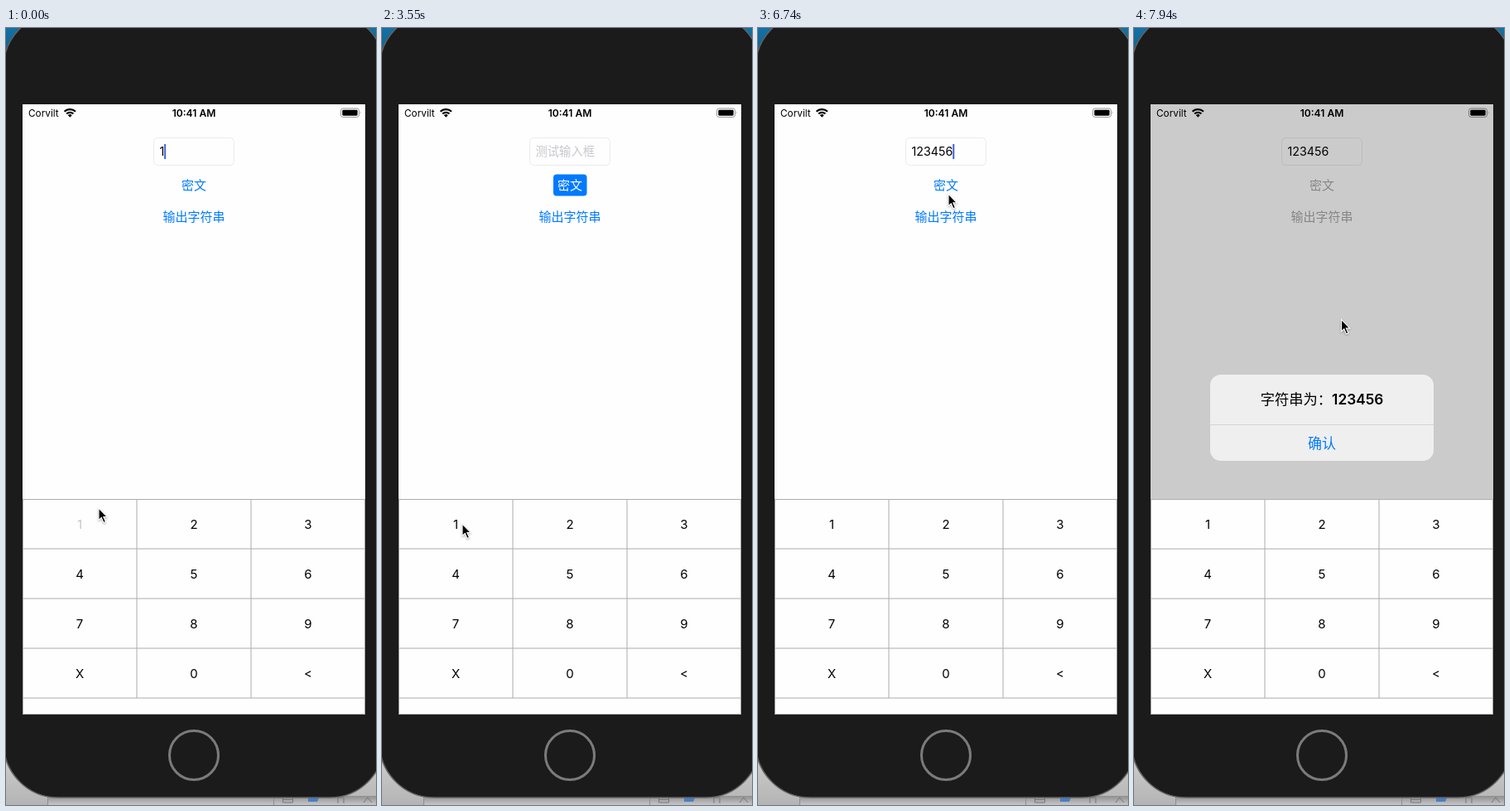
These frames come from a looping animation (447x937 px, 8000 ms). An HTML page:

```html
<!DOCTYPE html>
<html lang="zh-CN">
<head>
<meta charset="utf-8">
<style>
html, body { margin: 0; width: 100%; height: 100%; overflow: hidden; }
svg { display: block; width: 447px; height: 937px; font-family: Inter, "Noto Sans CJK SC", "Noto Sans CJK", sans-serif; }
.mid { text-anchor: middle; }
.rule { stroke: #acacac; fill: none; }
</style>
</head>
<body>
<svg viewBox="0 0 447 937">
  <defs>
    <linearGradient id="desk" x2="0" y2="1">
      <stop offset="0" stop-color="#1470a3"/><stop offset=".06" stop-color="#0f5480"/>
      <stop offset=".5" stop-color="#555"/><stop offset=".95" stop-color="#c8c8c8"/><stop offset="1" stop-color="#b4b4b4"/>
    </linearGradient>
    <linearGradient id="shade" x2="0" y2="1">
      <stop offset="0" stop-color="#8f8f8f"/><stop offset="1" stop-color="#c6c6c6"/>
    </linearGradient>
    <clipPath id="display"><path d="M20 92h414v736H20z"/></clipPath>
  </defs>

  <path fill="url(#desk)" d="M0 0h447v937H0z"/>
  <path fill="url(#shade)" d="M51 926h396v11H51z"/>
  <path stroke="#8d8d8d" d="M50.500 926v11M323.500 928v9"/>
  <path fill="none" stroke="#777" d="M334.500 926v8h12v-8M334 930.500h12M401 935v-7h7v7M432 934l5-6 5 6"/>
  <path fill="#4a7fc0" d="M365 926h14l-3 7h-11z"/>
  <rect x="-3" y="-18" width="460" height="946" rx="66" fill="#1b1b1b" stroke="#626262" stroke-width="1.500"/>
  <circle cx="227" cy="877" r="29.500" fill="#1b1b1b" stroke="#7b7b7b" stroke-width="3"/>

  <g clip-path="url(#display)">
    <path fill="#fefefe" d="M20 92h414v736H20z"/>
    <text x="27" y="106.500" font-size="11.800">Corvilt</text>
    <g fill="none" stroke="#000" stroke-width="2.300">
      <path d="M70.600 100.800a9.500 9.500 0 0 1 13.400 0M73.200 103.500a5.800 5.800 0 0 1 8.200 0"/>
      <path fill="#000" stroke="none" d="M77.300 107.800l-2.400-2.500a3.400 3.400 0 0 1 4.800 0z"/>
    </g>
    <text class="mid" x="227" y="106.500" font-size="12.100" font-weight="600">10:41 AM</text>
    <rect x="404.500" y="97" width="22" height="10.500" rx="2.700" fill="none" stroke="#999"/>
    <rect x="406.300" y="98.800" width="18.400" height="6.900" rx="1.400"/>
    <path fill="#999" d="M427.800 100.300q1.700 2 0 4z"/>

    <rect x="178.500" y="132.500" width="97" height="33" rx="5" fill="none" stroke="#ebebeb"/>
    <text id="hint" x="185.500" y="154" font-size="14.300" fill="#c7c7cd">测试输入框</text>
    <text id="plain" x="185.500" y="154" font-size="14.300"></text>
    <path id="dots" fill="none" stroke="#000" stroke-width="3.200" stroke-linecap="round" stroke-dasharray="0 6.400"/>
    <rect id="caret" y="140" width="2" height="18" fill="#3f62dc"/>

    <rect id="pill" x="207" y="176.500" width="40.500" height="26" rx="4" fill="#007aff"/>
    <text id="mask" class="mid" x="227" y="194.500" font-size="15">密文</text>
    <text id="show" class="mid" x="227" y="232.500" font-size="15">输出字符串</text>

    <path id="dim" d="M20 92h414v736H20z"/>
    <g id="alert">
      <rect x="92" y="418" width="270" height="104" rx="13" fill="#efefef"/>
      <path stroke="#d4d4d4" d="M92 478.500h270"/>
      <text class="mid" x="227" y="454" font-size="17.300" font-weight="500">字符串为&#xFF1A;<tspan font-weight="600">123456</tspan></text>
      <text id="ok" class="mid" x="227" y="507" font-size="17" fill="#007aff">确认</text>
    </g>
    <g id="pad">
      <path fill="#fefefe" d="M20 568h414v260H20z"/>
      <path class="rule" d="M20.500 568v260M158 568v240M296 568v240M433.500 568v260M20 568.500h414M20 628h414M20 688h414M20 748h414M20 808h414M20 827.500h414"/>
    </g>
  </g>
  <path id="pointer" d="M0 0v14.500l3.300-3 2.600 6 2.500-1.100-2.600-5.800h4.500z" stroke="#fff" stroke-width="1.100" style="filter:drop-shadow(0 1px 1px #0005)"/>
</svg>
<script>
const LOOP = 8000, ALERT_AT = 7335;
const el = {};
for (const node of document.querySelectorAll('[id]')) el[node.id] = node;

[...'123456789X0<'].forEach((label, i) => {
  const key = document.createElementNS('http://www.w3.org/2000/svg', 'text');
  key.textContent = label;
  key.setAttribute('class', 'mid');
  key.setAttribute('x', 89 + i % 3 * 138);
  key.setAttribute('y', 603.5 + Math.floor(i / 3) * 60);
  key.setAttribute('font-size', 15);
  el[label] = el.pad.appendChild(key);
});

// Runs of taps: first tap, interval, what is tapped, how far off centre the hand starts
const taps = [];
function run(start, interval, names, dx, dy) {
  names.split(' ').forEach((name, i) => {
    const last = taps.at(-1), settle = .3 ** i;
    const centre = axis => +el[name].getAttribute(axis);
    const [x, y] = last?.name === name
      ? [last.x, last.y]
      : [centre('x') + dx * settle, centre('y') - 5.5 + dy * settle];
    taps.push({ at: start + i * interval, name, x, y });
  });
}
run(-60, 440, '1 2 3', 23, -19);
run(1660, 290, '< < <', 10, -11);
run(2780, 0, 'mask', 8, 8);
run(3680, 335, '1 2 3', 8, 0);
run(4990, 365, '4 5 6', 41, -10);
run(6270, 0, 'mask', 3, 11);
run(7150, 0, 'show', 5, -5);
run(8235, 0, 'ok', 45, 0);

const clamp = v => Math.min(1, Math.max(0, v));
const show = (node, on) => node.style.display = on ? '' : 'none';
const ease = p => p < .5 ? 4 * p ** 3 : 1 - 4 * (1 - p) ** 3;
// Remaining distance of a critically damped spring
const spring = ms => { const s = Math.max(0, ms) * .018; return (1 + s) * Math.exp(-s); };

// The pointer rests after a tap and arrives shortly before the next one
function pointerAt(t) {
  const next = taps.findIndex(tap => tap.at > t);
  const from = taps[next - 1], to = taps[next];
  const leave = Math.max(from.at + 80, to.at - 450), arrive = to.at - 130;
  const e = ease(clamp((t - leave) / (arrive - leave)));
  return [from.x + (to.x - from.x) * e, from.y + (to.y - from.y) * e];
}

function draw(t) {
  let value = '', secret = false, edited = 0;
  for (const { name } of taps) el[name].style.opacity = 1;
  for (const { at, name } of taps) {
    if (at > t) break;
    el[name].style.opacity = .22 + .78 * clamp((t - at - 150) / 80);
    if (name === 'show') continue;
    edited = at;
    if (name === 'mask') secret = !secret;
    else value = name === '<' ? value.slice(0, -1) : value + name;
  }

  const alerting = t >= ALERT_AT, n = value.length;
  show(el.hint, !n);
  el.plain.textContent = secret ? '' : value;
  show(el.dots, secret && n);
  el.dots.setAttribute('d', `M189 150h${Math.max(0, n - 1) * 6.4 + .01}`);
  const width = secret ? n * 6.3 : n && el.plain.getComputedTextLength();
  el.caret.setAttribute('x', 185.3 + width);
  show(el.caret, !alerting && (t - edited) % 1000 < 600);

  show(el.pill, secret);
  const tint = alerting ? '#a6a6a6' : '#007aff';
  el.mask.setAttribute('fill', secret ? '#fff' : tint);
  el.show.setAttribute('fill', tint);

  const left = spring(t - ALERT_AT);
  show(el.alert, alerting);
  el.dim.setAttribute('opacity', .2 * (1 - left));
  el.alert.setAttribute('opacity', 1 - left);
  el.alert.setAttribute('transform', `translate(227 470) scale(${1 + .15 * left}) translate(-227 -470)`);
  const drop = alerting ? 260 * spring(t - ALERT_AT - 36) : 0;
  el.pad.setAttribute('transform', `translate(0 ${drop})`);
  el.pointer.setAttribute('transform', `translate(${pointerAt(t)})`);
}

function tick() {
  draw(performance.now() % LOOP);
  requestAnimationFrame(tick);
}
tick();
</script>
</body>
</html>
```
